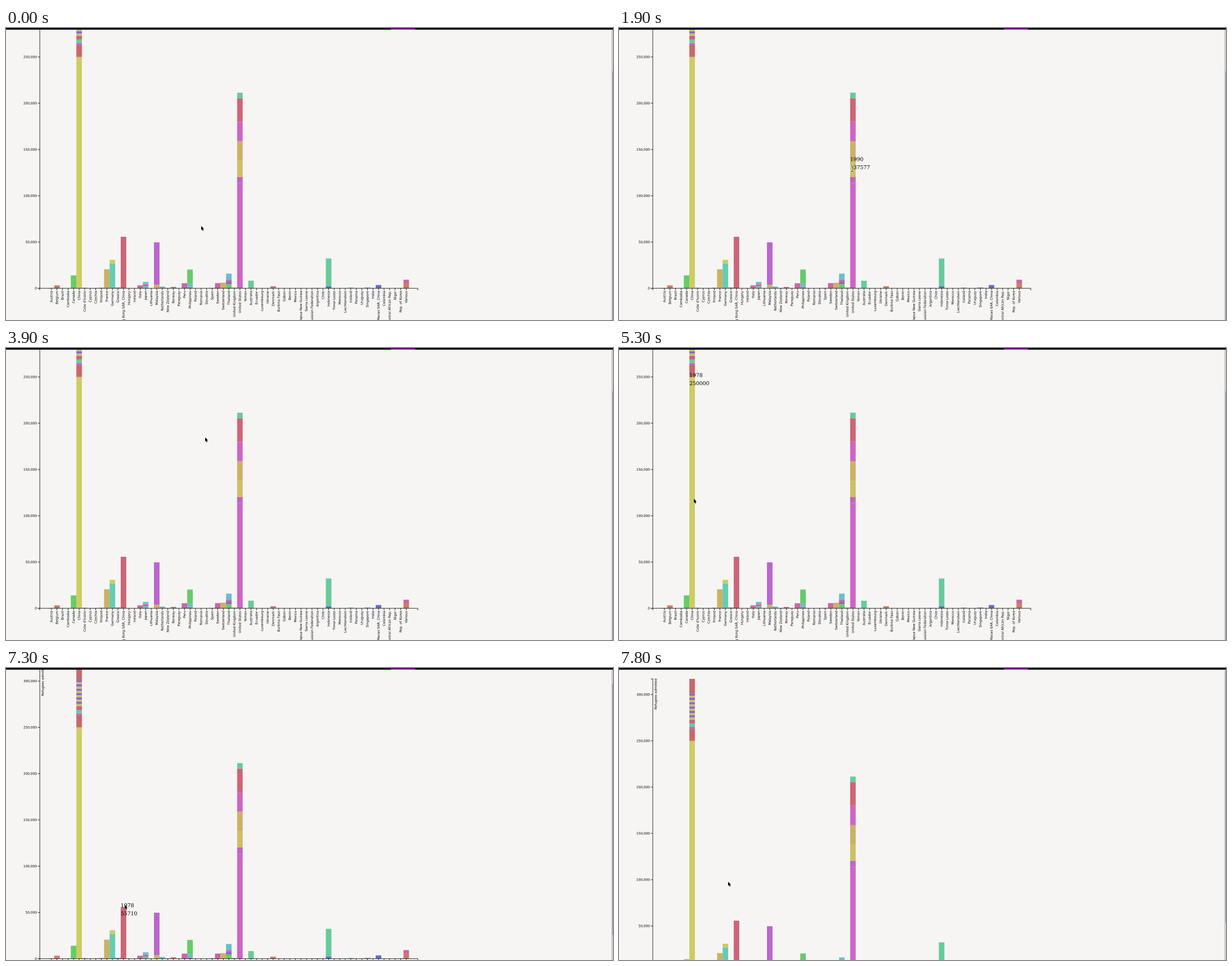
Write a matplotlib script that moves like this. It is 1079 px wide and 519 px high and loops after 8000 ms.

```python
import colorsys
import random

import matplotlib.pyplot as plt
import numpy as np
from matplotlib import patheffects
from matplotlib.animation import FuncAnimation
from matplotlib.patches import PathPatch, Polygon, Rectangle
from matplotlib.textpath import TextPath
from matplotlib.transforms import Affine2D

W, H, DPI = 1079, 519, 64
TICK_MS, TICKS = 100, 80
PT = 72 / DPI  # points per pixel
ZOOM = 0.58  # page zoom
AXIS_X, AXIS_END, TOP_K = 60.05, 732, 317
ZERO, PER_K = 462.7, 82.24 / 50  # baseline and pixels per thousand
LEFT, BAND = 75.8, 9.855
SMALL, LARGE = 10 * ZOOM, 16 * ZOOM
TIP_STEP, ASCENT, YEAR_WIDTH = 14.4, 7.5, 23.6
INK = "black"

COUNTRIES = (
    "Austria|Belgium|Brazil|Cambodia|Canada|China|Cote d'Ivoire|Cyprus|Czechia|"
    "Finland|France|Germany|Greece|Hong Kong SAR, China|Hungary|Ireland|Italy|"
    "Japan|Lithuania|Malaysia|Netherlands|New Zealand|Norway|Paraguay|Peru|"
    "Philippines|Poland|Romania|Slovakia|Spain|Sweden|Switzerland|Thailand|"
    "United Kingdom|United States|Yemen|Australia|Ecuador|Luxembourg|Ukraine|"
    "Denmark|Burkina Faso|Gabon|Benin|Mexico|Papua New Guinea|Sierra Leone|"
    "Russian Federation|Argentina|Chile|Indonesia|Timor-Leste|Morocco|"
    "Liechtenstein|Iceland|Panama|Uruguay|Singapore|India|Macao SAR, China|"
    "Colombia|Central African Rep.|Niger|Rep. of Korea|Various"
).split("|")
TRACES = ("Austria|Cote d'Ivoire|Czechia|Finland|Greece|New Zealand|Spain|"
          "United Kingdom|Argentina|Iceland|Singapore|Rep. of Korea").split("|")

# Hues in degrees.
RED, ORANGE, GOLD, YELLOW, LEAF, GREEN = 358, 12, 44, 60, 120, 150
TEAL, CYAN, BLUE, PURPLE = 164, 187, 235, 260
VIOLET, MAGENTA, PINK, ROSE = 290, 305, 325, 350

# Parts of each bar from the bottom up: hue, top in thousands.
BARS = {
    "Belgium": [(ORANGE, 3.2)],
    "Canada": [(LEAF, 14)],
    "China": [(YELLOW, 250), (RED, 263), (VIOLET, 265), (GREEN, 268.7),
              (ROSE, 273)],
    "France": [(GOLD, 20.6)],
    "Germany": [(TEAL, 26.9), (YELLOW, 30.8)],
    "Hong Kong SAR, China": [(ROSE, 55.71)],
    "Italy": [(PINK, 3.2)],
    "Japan": [(TEAL, 2.2), (PINK, 4.4), (CYAN, 6.9)],
    "Malaysia": [(GOLD, 4), (VIOLET, 49.7)],
    "Netherlands": [(CYAN, 1.9)],
    "Norway": [(ORANGE, 1.5)],
    "Peru": [(PINK, 5.5)],
    "Philippines": [(PINK, 1.3), (CYAN, 5.2), (LEAF, 20.3)],
    "Sweden": [(PINK, 5.6)],
    "Switzerland": [(GOLD, 6.1)],
    "Thailand": [(LEAF, 4.6), (PURPLE, 7.6), (PINK, 9.4), (CYAN, 15.9)],
    "United States": [(MAGENTA, 113.7), (VIOLET, 120.2), (YELLOW - 7, 137.577),
                      (GOLD, 158.999), (MAGENTA, 180.2), (ROSE, 205.5),
                      (GREEN, 211.4)],
    "Australia": [(GREEN, 8.2)],
    "Denmark": [(ORANGE, 2.2)],
    "Indonesia": [(BLUE, 2.4), (GREEN, 32.3)],
    "Macao SAR, China": [(BLUE, 3.6)],
    "Various": [(ORANGE, 5.2), (PINK, 9.3)],
}
FIRST_YEAR = {"United States": 1988}

# Pointer strokes: first tick, last tick, end point.
START = (347, 352)
STROKES = [
    (1, 1, 344, 351), (5, 8, 414, 347), (10, 10, 424, 343),
    (12, 12, 413.5, 336), (17, 21, 414, 244.5), (24, 24, 415, 234.5),
    (31, 31, 416, 195.5), (33, 33, 418, 174.5), (35, 35, 418, 167.5),
    (37, 37, 416, 158), (39, 39, 354, 159), (41, 41, 204, 210.5),
    (43, 43, 154, 220), (45, 45, 130, 233.5), (53, 53, 133, 268),
    (56, 56, 181, 415), (58, 58, 187, 418), (60, 60, 211, 421),
    (78, 78, 194, 380),
]
SCROLLS = {0: 0, 73: 54, 76: 78}

ARROW = 0.96 * np.array([(0, 0), (0, 7.4), (1.7, 5.9), (2.9, 8.7), (4.1, 8.2),
                         (3, 5.6), (5.1, 5.4)])
BEAM = np.array([(-2, -4), (2, -4), (0, -4), (0, 4), (-2, 4), (2, 4)])


def y_of(thousands):
    return ZERO - thousands * PER_K


def band_left(country):
    return LEFT + COUNTRIES.index(country) * BAND


def color_of(hue):
    return colorsys.hls_to_rgb(hue / 360, 0.6, 0.5)


def fill_bars():
    rng = random.Random(4)
    for name in TRACES:
        BARS[name] = [(rng.choice([CYAN, LEAF, BLUE, RED]),
                       rng.uniform(0.3, 0.9))]
    # Thin alternating bands crown the tallest bar.
    china = BARS["China"]
    china += [((PURPLE if i % 2 else GOLD + 8), 275.4 + 2.35 * i)
              for i in range(12)]
    china.append((RED, TOP_K))


def layer():
    ax = fig.add_axes([0, 0, 1, 1])
    ax.set_xlim(0, W)
    ax.set_ylim(H, 0)
    ax.axis("off")
    return ax


def box(ax, x0, y0, x1, y1, color, z=1, snap=None):
    return ax.add_patch(Rectangle((x0, y0), x1 - x0, y1 - y0, lw=0,
                                  color=color, zorder=z, snap=snap))


def line(xs, ys):
    page.plot(xs, ys, color=INK, lw=0.8 * PT, zorder=3, snap=False,
              solid_capstyle="butt", solid_joinstyle="miter")


def text_path(x, y, text, size, angle=0, end=False, font="DejaVu Sans"):
    path = TextPath((0, 0), text, size=size, prop={"family": font})
    shift = -path.get_extents().x1 if end else 0
    return (Affine2D().translate(shift, 0).scale(1, -1).rotate_deg(angle)
            .translate(x, y).transform_path(path))


def label(*args, **kw):
    return page.add_patch(PathPatch(text_path(*args, **kw), fc=INK, lw=0,
                                    zorder=4))


def draw_bars():
    for name, parts in BARS.items():
        x, base = band_left(name), 0
        for hue, top in parts:
            box(page, x, y_of(top), x + BAND, y_of(base), color_of(hue),
                snap=False)
            base = top


def draw_axes():
    tick = 6 * ZOOM
    line([AXIS_X - tick, AXIS_X, AXIS_X, AXIS_X - tick],
         [y_of(TOP_K), y_of(TOP_K), ZERO, ZERO])
    for k in range(0, 301, 50):
        y = y_of(k)
        line([AXIS_X - tick, AXIS_X], [y, y])
        label(54.5, y + 0.34 * SMALL, f"{k * 1000:,}", SMALL, end=True)
    label(67.2, y_of(TOP_K), "Refugees admitted", SMALL, -90, True)

    line([AXIS_X, AXIS_X, AXIS_END, AXIS_END],
         [ZERO + tick, ZERO, ZERO, ZERO + tick])
    for name in COUNTRIES:
        x = band_left(name) + BAND / 2
        line([x, x], [ZERO, ZERO + tick])
        label(x + 1.9, ZERO + 0.86 * SMALL, name, SMALL, -90, True)


def pointer(tick):
    place = np.array(START, float)
    for first, last, x, y in STROKES:
        if tick < first:
            break
        u = min(1, (tick - first + 1) / (last - first + 1))
        place += (np.array((x, y)) - place) * (1 - (1 - u) ** 3)
    return place


def over_tip(point, tip):
    if tip is None:
        return False
    dx, dy = point[0] - band_left(tip[0]), point[1] - y_of(tip[2])
    return 0 <= dx <= YEAR_WIDTH and -ASCENT <= dy <= TIP_STEP + 3


def hover(point, tip):
    """Tooltip text holds the pointer; otherwise the bar part under it counts."""
    if over_tip(point, tip):
        return tip
    for name, parts in BARS.items():
        if 0 <= point[0] - band_left(name) < BAND and point[1] < ZERO:
            for i, (_, top) in enumerate(parts):
                if point[1] >= y_of(top):
                    return name, FIRST_YEAR.get(name, 1978) + i, top
    return None


def simulate():
    states, place, tip, beam_on, scroll = [], pointer(0), None, False, 0
    for tick in range(TICKS):
        scroll = SCROLLS.get(tick, scroll)
        goal = pointer(tick)
        for u in np.linspace(0, 1, 60):
            point = place + (goal - place) * u - (0, scroll)
            tip = hover(point, tip)
        if np.any(goal != place):
            beam_on = over_tip(point, tip)
        place = goal
        states.append((place, scroll, tip, beam_on))
    return states


fig = plt.figure(figsize=(W / DPI, H / DPI), dpi=DPI, facecolor="#f6f5f4")
page, screen = layer(), layer()
fill_bars()
draw_bars()
draw_axes()
tips = [label(0, 0, "0", LARGE) for _ in range(2)]

box(screen, 1076, 3, W, H, "#cfcecd")
thumb = box(screen, 1077.6, 77, W, 523, "#85838a", 2)
box(screen, 0, 0, W, 3, "#0f0a18", 3)
box(screen, 684, 1, 727, 3, "#b414d2", 4)

arrow = screen.add_patch(Polygon(ARROW, fc=INK, ec="none", zorder=6))
arrow.set_path_effects([
    patheffects.withStroke(linewidth=0.5 * PT, foreground="#ffffff90")])
beam, = screen.plot([], [], color="#333333", lw=0.8 * PT, zorder=6)
beam.set_path_effects([
    patheffects.withStroke(linewidth=2.2 * PT, foreground="white")])
STATES = simulate()


def update(tick):
    place, scroll, tip, beam_on = STATES[tick]
    page.set_ylim(H - scroll, -scroll)
    thumb.set_y(77 - scroll * 0.915)

    arrow.set_visible(not beam_on)
    arrow.set_xy(ARROW + place)
    beam.set_visible(beam_on)
    beam.set_data(*(BEAM + place).T)

    for row, patch in enumerate(tips):
        patch.set_visible(tip is not None)
        if tip:
            name, year, top = tip
            text = str(round(top * 1000) if row else year)
            patch.set_path(text_path(band_left(name), y_of(top) + row * TIP_STEP,
                                     text, LARGE, font="DejaVu Serif"))
    return [arrow, beam, thumb, *tips]


anim = FuncAnimation(fig, update, frames=TICKS, interval=TICK_MS,
                     repeat=True, repeat_delay=0, blit=False)
plt.show()
```
